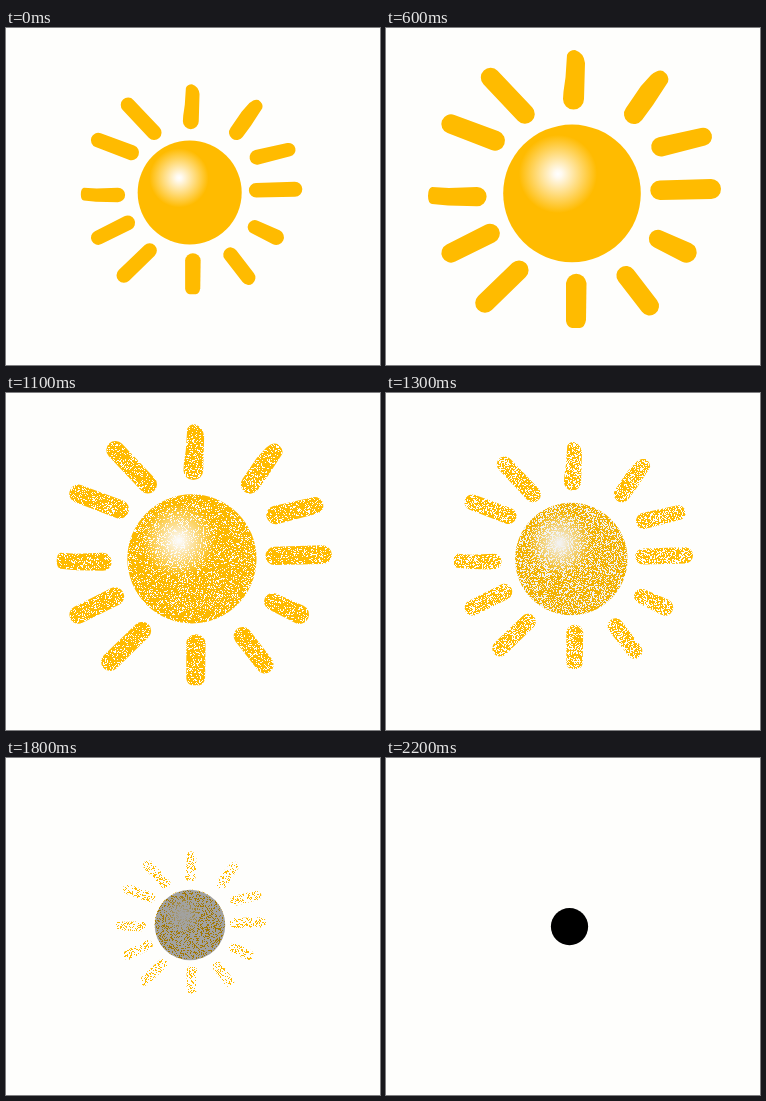
An HTML page with a canvas that plays this animation: 374 px wide and 337 px high, repeating every 6200 ms.

```html
<!DOCTYPE html>
<html lang="en">
<head>
<meta charset="utf-8">
<title>Sun to dot</title>
<style>
  html, body { margin: 0; width: 100%; height: 100%; overflow: hidden; background: #fefefc; }
  canvas { display: block; }
</style>
</head>
<body>
<canvas id="stage" width="374" height="337"></canvas>
<script>
const W = 374, H = 337, LOOP = 6200;
const GROW_STEP = 150, GROW_END = 900, FADE_STEP = 100, LAST = 13;
const RATE = 0.0575;
const PAPER = '#fefefc', GOLD = '#ffbb00';
const disc = { x: 186, y: 165.4, r: 68.8 };
const DRAWN_AT = 0.9425; // scale at which the sun's coordinates are given

const canvas = document.getElementById('stage');
const ctx = canvas.getContext('2d', { willReadFrequently: true });

// Rounded rays: inner x, y, radius, outer x, y, radius
const rays = [
  [275, 118.7, 9.8, 317, 108.7, 9],
  [274, 162.3, 9.7, 325, 161, 10],
  [272, 211, 9.2, 300.5, 224.5, 10.2],
  [240, 247.5, 9.6, 263.5, 278, 9.5],
  [133, 242, 9.6, 99, 275, 9.8],
  [104, 205.5, 9.8, 65, 225, 9.6],
  [109, 112.6, 10, 65, 96, 9.7],
  [139, 86, 9.8, 104.5, 49.5, 9.7]
];

// Rays with an uneven outer end
const unevenRays = [
  'M177 71C177 61 180 52 180 42L181 27Q183 22 189 22Q198 25 199 35L198 71A10.5 10.5 0 0 1 177 71Z',
  'M240 80L255 58L265 47Q272 41 277 43Q284 48 282 54L267 77L256 92A9.8 9.8 0 0 1 240 80Z',
  'M180 255A10.3 10.3 0 0 1 200.5 255L200 292Q199 299 194 300L186 300Q181 299 180 293Z',
  'M46 159L63 160L91 159A9.6 9.6 0 0 1 91 178.2L62 177.5L46 176Q42 175 42 168Q42 160 46 159Z'
].map(d => new Path2D(d));

function capsule(x1, y1, r1, x2, y2, r2) {
  const a = Math.atan2(y2 - y1, x2 - x1), q = Math.PI / 2;
  ctx.beginPath();
  ctx.arc(x1, y1, r1, a + q, a + 3 * q);
  ctx.arc(x2, y2, r2, a - q, a + q);
  ctx.fill();
}

function circle(x, y, r, fill) {
  ctx.fillStyle = fill;
  ctx.beginPath();
  ctx.arc(x, y, r, 0, 2 * Math.PI);
  ctx.fill();
}

function zoom(x, y, s) {
  ctx.translate(x, y);
  ctx.scale(s, s);
  ctx.translate(-x, -y);
}

function drawSun(grow, shrink) {
  ctx.save();
  zoom(181, 167.5, shrink);
  zoom(176.5, 162, grow / DRAWN_AT);
  ctx.fillStyle = GOLD;
  rays.forEach(r => capsule(...r));
  unevenRays.forEach(p => ctx.fill(p));
  const shine = ctx.createRadialGradient(172, 146, 0, 172, 146, 39);
  shine.addColorStop(0, '#ffffff');
  shine.addColorStop(0.1, '#fffaf0');
  shine.addColorStop(1, GOLD);
  circle(disc.x, disc.y, disc.r, shine);
  const m = ctx.getTransform();
  ctx.restore();
  return { x: m.a * disc.x + m.e, y: m.d * disc.y + m.f, r: m.a * disc.r };
}

function random(seed) {
  return () => {
    seed = (seed + 0x6D2B79F5) | 0;
    let v = Math.imul(seed ^ (seed >>> 15), seed | 1);
    v ^= v + Math.imul(v ^ (v >>> 7), v | 61);
    return ((v ^ (v >>> 14)) >>> 0) / 4294967296;
  };
}

// Turns a random share of the pixels back into paper
function dissolve(share, seed) {
  const img = ctx.getImageData(0, 0, W, H);
  const px = new Uint32Array(img.data.buffer), paper = px[0], rnd = random(seed);
  for (let i = 0; i < px.length; i++) if (rnd() < share) px[i] = paper;
  ctx.putImageData(img, 0, 0);
}

function draw(growStep, fadeStep) {
  const share = (fadeStep + 1) / (LAST + 1);
  ctx.fillStyle = PAPER;
  ctx.fillRect(0, 0, W, H);
  const sun = drawSun(1 - RATE * (5 - growStep), 1 - RATE * Math.max(0, fadeStep));
  if (fadeStep < 0) return;
  dissolve(share, 1000 * (fadeStep + 1));
  const drift = share ** 4;
  ctx.globalAlpha = share ** 3;
  circle(sun.x + 1.1 * drift, sun.y + 1.6 * drift, sun.r + 0.2 * drift, '#000');
  ctx.globalAlpha = 1;
}

const start = performance.now();
let shown = '';

function tick() {
  const t = (performance.now() - start) % LOOP;
  const growStep = Math.min(5, Math.floor(t / GROW_STEP));
  const fadeStep = t < GROW_END ? -1 : Math.min(LAST, Math.floor((t - GROW_END) / FADE_STEP));
  const pose = growStep + ':' + fadeStep;
  if (pose !== shown) {
    draw(growStep, fadeStep);
    shown = pose;
  }
  requestAnimationFrame(tick);
}
tick();
</script>
</body>
</html>
```
